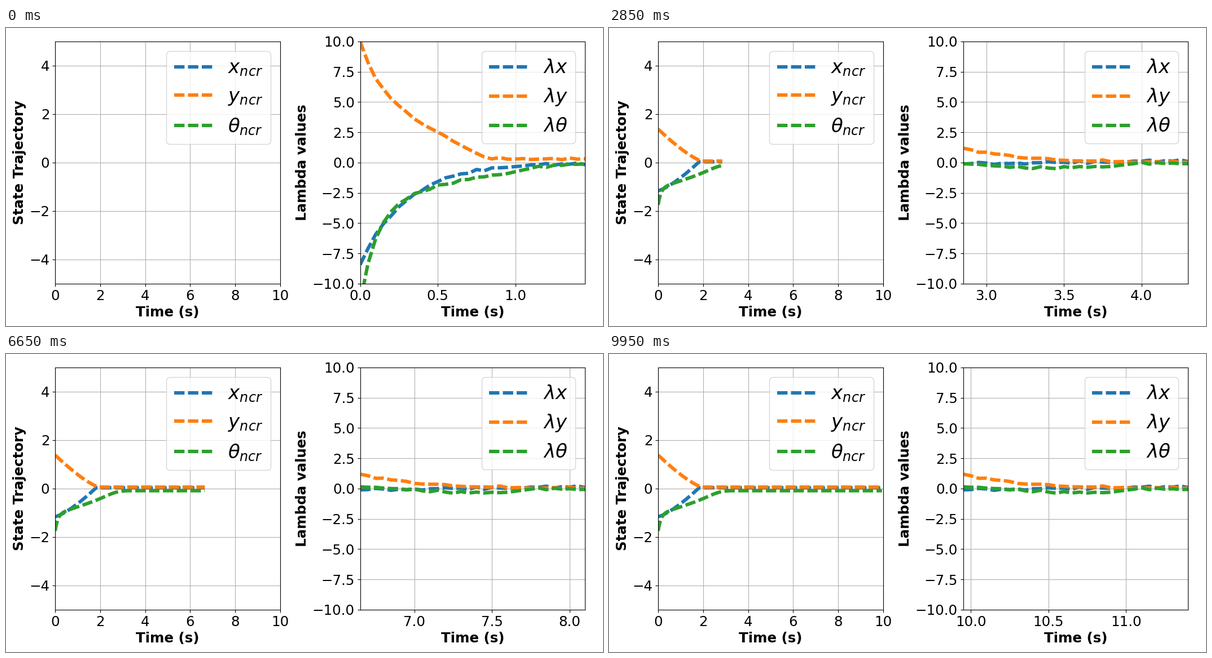
Recreate the animation shown at these times as a matplotlib script. Size 1058 by 529 pixels, loop 10 s.

```python
import numpy as np
import matplotlib.pyplot as plt
from matplotlib.animation import FuncAnimation
from matplotlib.ticker import FormatStrFormatter, MultipleLocator

W, H, DPI = 1058, 529, 100
FRAMES, DT = 200, 0.05
HORIZON = 30
COLORS = ("#1f77b4", "#ff7f0e", "#2ca02c")
DASH = dict(lw=4.41, ls=(0, (3, 1)))
LABEL_SIZE, LEGEND_SIZE = 17.64, 24.5


def ramp(p, power=1.0):
    """Fall from 1 to 0 while p goes from 0 to 1, then stay at 0."""
    return np.clip(1 - p, 0, 1) ** power


def decay(x, scale):
    return np.exp(-x / scale)


def bell(x, center, width):
    return np.exp(-((x - center) / width) ** 2)


# State trajectories over the whole run.
time = np.arange(FRAMES) * DT
x_path = 0.03 - 1.19 * (1 - np.minimum(time / 1.82, 1) ** 1.33)
y_path = 0.06 + 1.32 * ramp(time / 1.95, 1.3)
th_slow = 0.97 * ramp(time / 3.23) / (1 + np.exp((time - 2.6) / 0.3))
th_path = -0.09 - 0.69 * decay(time, 0.12) - th_slow
states = (x_path, y_path, th_path)

# Predicted multipliers (x, y, theta) over the horizon at key moments.
k = np.arange(HORIZON)
start = np.array([
    -8.4 * decay(k, 6),
    4.4 * decay(k, 2.6) + 5.3 * ramp(k / 16.5) + 0.3,
    -8.3 * decay(k, 2.2) - 3.3 * ramp(k / 30, 1.4)])
middle = np.array([
    0.22 - 2.4 * bell(k, 0.5, 6),
    3.5 * ramp(k / 16, 1.7),
    2.5 * decay(k, 2.2) - 2.9 * ramp(k / 26, 1.5)])
x_rest = -0.08 + 0.28 * (k / HORIZON) ** 1.5
y_rest = 1.2 * decay(k, 7.5)
late = np.array([x_rest, y_rest, -0.45 * bell(k, 11, 10)])
steady = np.array([
    x_rest, y_rest, 0.1 * decay(k, 5) - 0.36 * bell(k, 14, 7)])
jitter = np.random.default_rng(4).normal(0, 0.05, (3, HORIZON))

STAGES = [(0, start), (1.3, middle), (2.85, late), (4.5, steady)]


def multipliers(t):
    for (t0, before), (t1, after) in zip(STAGES, STAGES[1:]):
        if t <= t1:
            return after + (before - after) * ramp((t - t0) / (t1 - t0), 1.5) \
                + jitter
    return steady + jitter


def panel(x0, ylim, ystep, ylabel, labels):
    width, top, bottom = 398.7, 23.8, 453.8
    ax = fig.add_axes([x0 / W, 1 - bottom / H, width / W, (bottom - top) / H])
    ax.set_ylim(-ylim, ylim)
    ax.yaxis.set_major_locator(MultipleLocator(ystep))
    ax.set_xlabel("Time (s)", fontsize=LABEL_SIZE, fontweight="bold")
    ax.set_ylabel(ylabel, fontsize=LABEL_SIZE, fontweight="bold")
    ax.tick_params(labelsize=LABEL_SIZE)
    ax.grid(True)
    lines = [ax.plot([], [], color=c, label=s, **DASH)[0]
             for c, s in zip(COLORS, labels)]
    ax.legend(loc="upper right", fontsize=LEGEND_SIZE)
    return ax, lines


plt.rcParams["font.family"] = "DejaVu Sans"
fig = plt.figure(figsize=(W / DPI, H / DPI), dpi=DPI, facecolor="white")

left, state_lines = panel(
    87.1, 5, 2, "State Trajectory",
    [r"$x_{ncr}$", r"$y_{ncr}$", r"$\theta_{ncr}$"])
left.set_xlim(0, 10)
left.xaxis.set_major_locator(MultipleLocator(2))

right, lambda_lines = panel(
    627.6, 10, 2.5, "Lambda values",
    [r"$\lambda x$", r"$\lambda y$", r"$\lambda \theta$"])
right.xaxis.set_major_locator(MultipleLocator(0.5))
right.xaxis.set_major_formatter(FormatStrFormatter("%.1f"))
right.yaxis.set_major_formatter(
    lambda v, _: f"{v:.1f}".replace("-", "\u2212"))


def draw(i):
    t = i * DT
    for line, path in zip(state_lines, states):
        line.set_data(time[:i + 1], path[:i + 1])
    ahead = t + k * DT
    for line, row in zip(lambda_lines, multipliers(t)):
        line.set_data(ahead, row)
    right.set_xlim(ahead[0], ahead[-1])
    return state_lines + lambda_lines


def reset():
    return draw(0)


anim = FuncAnimation(fig, draw, frames=FRAMES, init_func=reset,
                     interval=50, repeat=True, repeat_delay=0)
plt.show()
```
